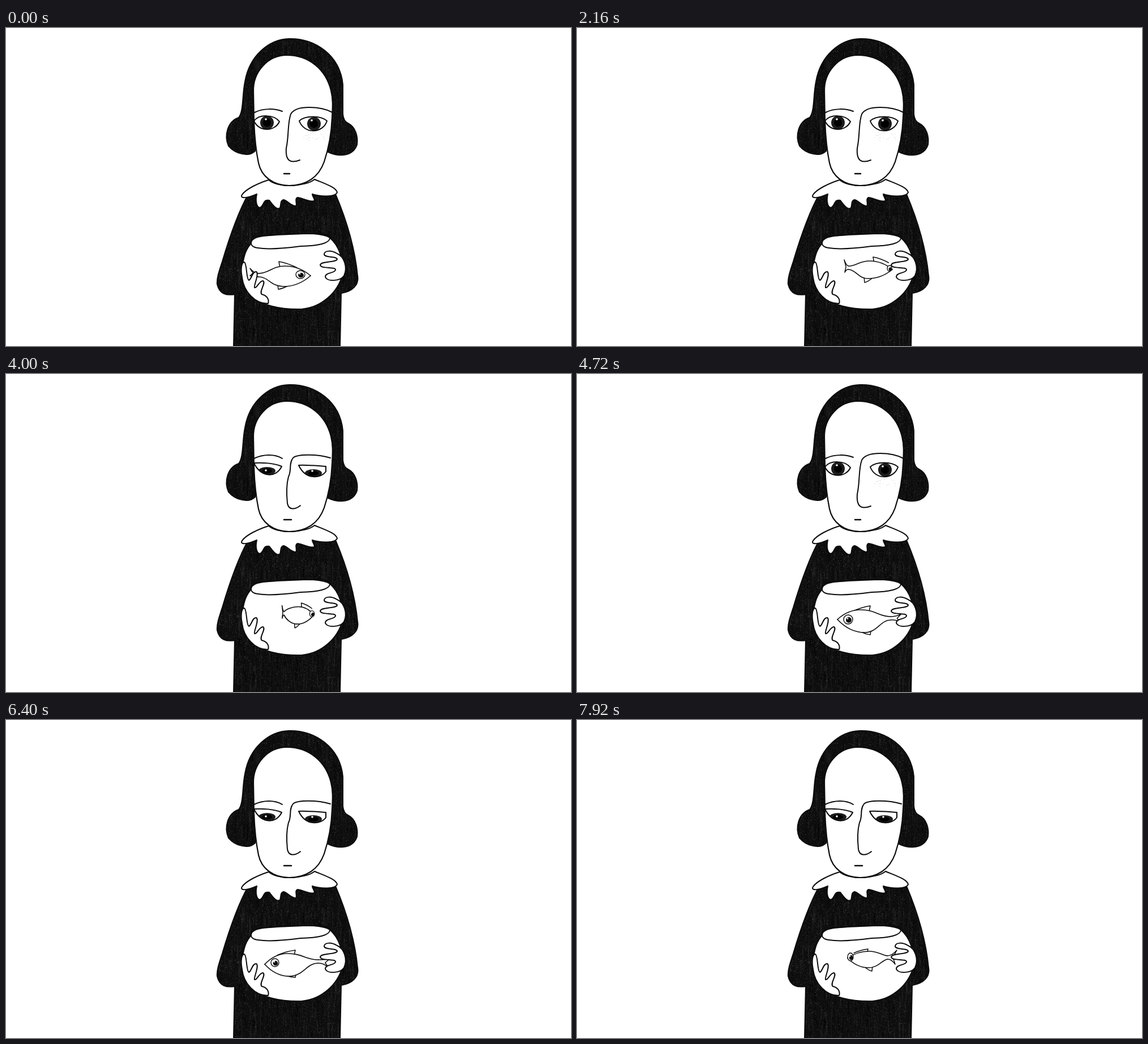
Recreate the animation shown at these times as an HTML page with a canvas. Size 998x561 px, loop 8000 ms.

```html
<!DOCTYPE html>
<html lang="en">
<head>
<meta charset="utf-8">
<title>Fishbowl</title>
<style>
html, body { margin: 0; width: 100%; height: 100%; overflow: hidden; background: #fff; }
canvas { display: block; width: 998px; height: 561px; }
</style>
</head>
<body>
<canvas id="stage" width="998" height="561"></canvas>
<script>
const W = 998, H = 561, LOOP = 8000, STEP = 80, SWIM = 1760;
const INK = '#0b0b0b', CLOTH = '#0e0e0e';
const ctx = document.getElementById('stage').getContext('2d');
const path = d => new Path2D(d);

const hair = path('M411 158C420 146 417 120 422 95C430 48 465 20 500 19C546 18 590 48 595 100L595 152C596 162 600 166 604 168C618 175 622 192 620 206C613 226 590 229 567 218L560 120L440 120L440 217C428 229 404 221 393 208C385 190 391 165 411 158Z');
const face = path('M437 112C436 78 462 48 496 48C536 48 565 74 574 110C578 126 577 140 576 158C575 184 570 212 562 236C552 264 530 278 500 278C472 278 451 262 446 238C441 214 439 190 438 165Z');
const body = path('M428 293C410 325 396 365 382 412C376 430 372 442 373 452C377 470 390 472 404 470L402 563L590 563L592 468C612 465 624 453 621 437C617 395 604 345 582 293Z');
const collar = path('M464 268C445 274 424 284 417 294C412 302 428 300 443 293C440 306 443 316 448 317C454 316 455 304 460 304C467 303 465 305 469 309C475 317 481 321 484 317C486 313 484 304 490 303C496 303 503 314 512 314C515 310 509 301 515 299C522 299 535 308 545 305C545 300 541 297 541 293C556 298 582 298 585 290C583 281 564 275 545 267C530 280 480 282 464 268Z');
const bowl = path('M433 380C416 398 412 440 427 466C443 490 490 497 522 496C558 493 586 466 594 436C597 408 588 384 572 370C560 362 530 362 500 363C450 366 430 366 433 380Z');
const rim = path('M433 378C435 366 462 366 500 364C545 362 572 361 572 371C571 380 553 384 520 385C490 389 463 391 445 388C436 387 432 383 433 378Z');
const leftHand = path('M417 440C414 425 416 413 421 413C426 416 424 443 429 445C434 443 435 429 442 430C448 433 437 455 439 458C443 460 447 446 454 446C460 450 446 465 452 470C462 472 465 480 463 486C440 487 420 465 417 440Z');
const rightHand = path('M585 398C575 392 563 392 562 399C562 406 585 402 585 408C583 414 556 411 555 418C556 426 583 420 582 427C580 433 564 431 564 439C567 448 590 447 597 437C604 422 597 403 585 398Z');

const looks = {
  ahead: {
    lines: path('M439 149C455 141 475 142 488 147M577 149C556 138 512 135 503 152C497 168 500 190 495 212C493 238 506 238 519 233'),
    mouth: path('M491 257L501 257'),
    eyes: [path('M438 164C447 152 473 152 483 165C475 183 447 184 438 164Z'),
           path('M518 164C528 154 556 154 567 164C560 186 527 188 518 164Z')],
    irises: [[461, 167, 12, 12], [544, 169, 12, 12]],
    glints: [[459, 161], [540, 163]]
  },
  down: {
    lines: path('M438 149C455 141 475 141 488 149M573 148C550 141 514 141 507 148C499 158 505 170 499 181C496 192 495 208 497 228C499 240 510 240 520 232'),
    mouth: path('M491 257L504 257'),
    eyes: [path('M438 157C452 156 474 157 487 163C477 184 450 183 438 157Z'),
           path('M517 161C530 160 550 162 565 163L565 172C556 185 529 187 517 161Z')],
    irises: [[461, 171, 15, 7], [543, 175, 15, 7]],
    glints: [[459, 170], [541, 171]]
  }
};

// time, then: mouth, top, tail root, tail tips (2), belly, dorsal tip, belly fin tip, eye, eye radii
const poses = [
  [0, 538,437, 493,420, 446,436, 431,424, 431,437, 490,456, 482,412, 481,461, 520,435, 8,7],
  [400, 557,426, 517,411, 480,423, 472,409, 473,431, 514,442, 523,404, 508,449, 552,424, 4,5],
  [880, 478,420, 516,408, 548,419, 565,406, 562,431, 515,437, 514,404, 521,443, 483,418, 5,7],
  [1120, 457,431, 497,412, 551,426, 571,422, 570,437, 500,452, 511,406, 511,454, 475,428, 7,7],
  [1200, 460,433, 501,416, 554,431, 572,424, 571,438, 508,456, 518,409, 518,460, 479,433, 8,8],
  [1600, 525,443, 501,416, 481,430, 472,418, 470,432, 500,456, 493,412, 487,458, 513,436, 8,8]
];

function draw(c, shape, width, fill) {
  if (fill) { c.fillStyle = fill; c.fill(shape); }
  c.strokeStyle = INK;
  c.lineWidth = width;
  c.lineCap = c.lineJoin = 'round';
  c.stroke(shape);
}

function dot(c, x, y, rx, ry, fill) {
  c.fillStyle = fill;
  c.beginPath();
  c.ellipse(x, y, rx, ry, 0, 0, Math.PI * 2);
  c.fill();
}

function layer(paint) {
  const cv = document.createElement('canvas');
  cv.width = W;
  cv.height = H;
  paint(cv.getContext('2d'));
  return cv;
}

function random(seed) {
  return () => (seed = (seed * 16807) % 2147483647) / 2147483647;
}

// Felt-tip fill: near-black tone, faint upright streaks and paper grain
function felt(c, shape, x, y, w, h, seed) {
  const rnd = random(seed);
  c.save();
  c.clip(shape);
  c.fillStyle = CLOTH;
  c.fillRect(x, y, w, h);
  for (let i = 0; i < w * h / 110; i++) {
    c.fillStyle = rnd() < 0.5 ? 'rgba(0,0,0,.3)' : 'rgba(255,255,255,.035)';
    c.fillRect(x + rnd() * w, y + rnd() * h, 1 + rnd() * 2, 8 + rnd() * 28);
  }
  for (let i = 0; i < w * h / 12; i++) {
    c.fillStyle = `rgba(255,255,255,${0.05 + rnd() * 0.12})`;
    c.fillRect(Math.floor(x + rnd() * w), Math.floor(y + rnd() * h), 1, 1);
  }
  c.restore();
  draw(c, shape, 2);
}

function drawLook(c, look) {
  draw(c, look.lines, 2);
  draw(c, look.mouth, 2.5);
  look.eyes.forEach((eye, i) => {
    const [x, y, rx, ry] = look.irises[i], [gx, gy] = look.glints[i];
    c.save();
    c.clip(eye);
    dot(c, x, y, rx, ry, '#1c1c1c');
    dot(c, x, y, rx * 0.6, ry * 0.6, '#000');
    dot(c, gx, gy, 1.8, 1.8, '#fff');
    c.restore();
    draw(c, eye, 2);
  });
}

const figure = look => layer(c => {
  c.fillStyle = '#fff';
  c.fillRect(0, 0, W, H);
  felt(c, body, 370, 288, 254, 275, 71);
  felt(c, hair, 386, 17, 238, 212, 29);
  draw(c, collar, 2, '#fff');
  draw(c, face, 2.2, '#fff');
  drawLook(c, look);
  if (look === looks.ahead) {
    const rnd = random(5);
    for (let i = 0; i < 26; i++) dot(c, 526 + rnd() * 38, 181 + rnd() * 19, 0.5, 0.5, '#bbb');
  }
  draw(c, bowl, 2, '#fff');
  draw(c, rim, 2);
});

const ahead = figure(looks.ahead), down = figure(looks.down);
const hands = layer(c => [leftHand, rightHand].forEach(h => draw(c, h, 2, '#fff')));

function poseAt(t) {
  const i = poses.findLastIndex(p => p[0] <= t);
  const a = poses[i], b = poses[(i + 1) % poses.length];
  const end = b[0] || SWIM, k = (t - a[0]) / (end - a[0]);
  const v = a.slice(1).map((n, j) => n + (b[j + 1] - n) * k);
  return Array.from({ length: 10 }, (_, j) => ({ x: v[2 * j], y: v[2 * j + 1] }));
}

const lerp = (a, b, k) => a + (b - a) * k;
const mix = (a, b, k) => ({ x: lerp(a.x, b.x, k), y: lerp(a.y, b.y, k) });

// One flank, mouth to tail: blunt head and slim tail side-on, rounder end-on
function flank(mouth, mid, root, dy) {
  const p = new Path2D(), dx = mouth.x - root.x, len = Math.abs(dx);
  const slim = Math.min(1, Math.max(0, (len - 40) / 40));
  const d = (Math.sign(dx) || 1) * Math.max(0, 45 - len) * 0.5;
  const rootY = root.y + dy * 3;
  p.moveTo(mouth.x, mouth.y);
  p.quadraticCurveTo(lerp(mid.x, mouth.x, 0.55) + d, mid.y, mid.x, mid.y);
  p.bezierCurveTo(lerp(mid.x, root.x, 0.5) - d, mid.y,
    lerp(root.x, mid.x, 0.4 * slim) - d, lerp(lerp(rootY, mid.y, 0.6), rootY, slim), root.x, rootY);
  return p;
}

function fin(c, tip, back, front, lift) {
  const p = new Path2D();
  p.moveTo(back.x, back.y);
  p.lineTo(tip.x, tip.y);
  p.quadraticCurveTo(lerp(tip.x, front.x, 0.5), lerp(tip.y, front.y, 0.35) + lift, front.x, front.y);
  draw(c, p, 1.5, '#fff');
}

function drawFish(c, t) {
  const [mouth, top, root, up, low, belly, dorsal, under, eye, r] = poseAt(t);
  const side = Math.sign(mouth.x - root.x) || 1;
  const notch = mix(mix(up, low, 0.5), root, 0.35);
  const reach = side * Math.min(1, Math.abs(mouth.x - root.x) / 90);

  const tail = new Path2D();
  tail.moveTo(root.x, root.y - 3);
  tail.quadraticCurveTo(lerp(root.x, up.x, 0.5), root.y - 3, up.x, up.y);
  tail.lineTo(notch.x, notch.y);
  tail.lineTo(low.x, low.y);
  tail.quadraticCurveTo(lerp(root.x, low.x, 0.5), root.y + 2, root.x, root.y + 3);
  draw(c, tail, 1.5, '#fff');

  fin(c, dorsal, { x: dorsal.x + reach * 2, y: top.y + 3 }, { x: dorsal.x + reach * 32, y: top.y + 3 }, -1);
  fin(c, under, { x: under.x - reach, y: belly.y - 2 }, { x: under.x + reach * 16, y: belly.y - 1 }, 1);

  const upper = flank(mouth, top, root, -1), lower = flank(mouth, belly, root, 1);
  c.fillStyle = '#fff';
  const shape = new Path2D(upper);
  shape.lineTo(root.x, root.y + 3);
  shape.lineTo(mouth.x, mouth.y);
  c.fill(shape);
  const under2 = new Path2D(lower);
  under2.lineTo(root.x, root.y - 3);
  c.fill(under2);
  draw(c, upper, 1.6);
  draw(c, lower, 1.6);

  const ring = new Path2D();
  ring.ellipse(eye.x, eye.y, r.x, r.y, 0, 0, Math.PI * 2);
  draw(c, ring, 1.4, '#fff');
  dot(c, eye.x + 1, eye.y + 1, r.x * 0.62, r.y * 0.62, INK);
  dot(c, eye.x - 1, eye.y - 1.5, 1.3, 1.3, '#fff');
}

const looksDown = t => (t >= 3040 && t < 4440) || t >= 5760;

function frame(now) {
  const t = Math.floor((now % LOOP) / STEP) * STEP;
  ctx.drawImage(looksDown(t) ? down : ahead, 0, 0);
  ctx.save();
  ctx.clip(bowl);
  drawFish(ctx, t % SWIM);
  ctx.restore();
  ctx.drawImage(hands, 0, 0);
}

const start = performance.now();
function tick() {
  frame(performance.now() - start);
  requestAnimationFrame(tick);
}
tick();
</script>
</body>
</html>
```
